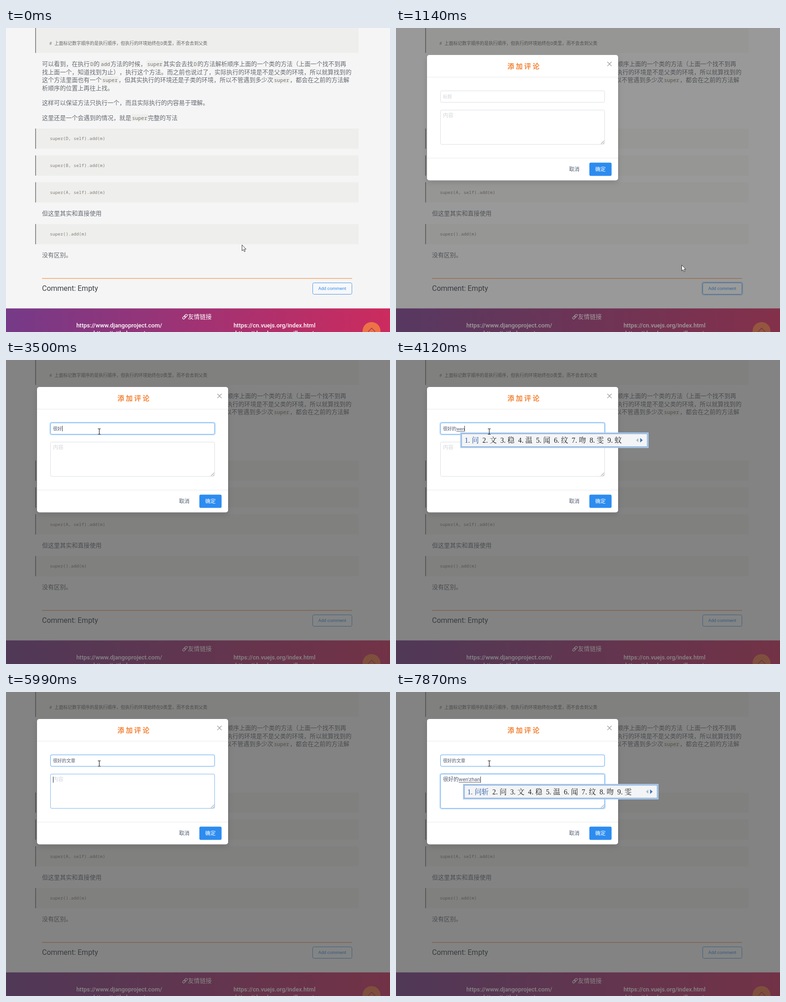
Recreate the animation shown at these times as an HTML page. Size 842 by 665 pixels, loop 8 s.

```html
<!DOCTYPE html>
<html lang="zh">
<head>
<meta charset="utf-8">
<title>添加评论</title>
<style>
html, body { margin: 0; width: 100%; height: 100%; overflow: hidden; background: #f5f5f5; }
svg { display: block; width: 842px; height: 665px; text-spacing-trim: space-all; font-family: Roboto, "Noto Sans CJK SC", "Noto Sans CJK", sans-serif; }
.p { font-size: 13.06px; font-weight: 300; fill: #666b72; }
.c { font: 300 9.63px "Noto Sans Mono", "Noto Sans CJK SC", "Noto Sans CJK", monospace; fill: #857e76; }
.k { font: 300 11.1px "Noto Sans Mono", monospace; fill: #77736f; }
.link { font-size: 13px; font-weight: 500; fill: #fff; text-anchor: middle; }
.cand { font: 15.66px "Liberation Serif", "Noto Serif CJK SC", "Noto Sans CJK SC", "Noto Sans CJK", serif; fill: #222; }
.cand.first { fill: #2858a8; }
.hint { fill: #d3d5d9; }
.typed { fill: #515a6e; }
</style>
</head>
<body>
<svg viewBox="0 0 842 665">
  <defs>
    <linearGradient id="foot"><stop stop-color="#753a88"/><stop offset="1" stop-color="#cc2b5e"/></linearGradient>
    <filter id="soft" x="-10%" y="-10%" width="120%" height="125%"><feDropShadow dx="0" dy="4" stdDeviation="6" flood-opacity=".15"/></filter>
  </defs>
  <rect width="842" height="665" fill="#f5f5f5"/>
  <g id="article"></g>
  <path d="M79 547.7H759" stroke="#f3a469" stroke-width="1.6"/>
  <text x="79" y="575" font-size="16" fill="#3c4148">Comment: Empty</text>
  <rect id="ring" x="671" y="556" width="89" height="28" rx="4" fill="none" stroke="#2d8cf0" stroke-opacity=".3" stroke-width="2"/>
  <rect x="672.5" y="557.5" width="86" height="25" rx="3" fill="#f7f8f9" stroke="#4a98e8"/>
  <text x="715.4" y="573" font-size="9.75" fill="#2d8cf0" text-anchor="middle">Add comment</text>

  <rect y="613.4" width="842" height="52" fill="url(#foot)"/>
  <g fill="none" stroke="#fff" stroke-width="1.2" transform="translate(392.5 631.5) rotate(-45)">
    <rect x="-6.4" y="-2.2" width="7.6" height="4.4" rx="2.2"/>
    <rect x="-1.2" y="-2.2" width="7.6" height="4.4" rx="2.2"/>
  </g>
  <text x="398.8" y="635.5" font-size="13.06" fill="#fff">友情链接</text>
  <g class="link">
    <text x="248.3" y="654.5">https://www.djangoproject.com/</text>
    <text x="588.7" y="654.5">https://cn.vuejs.org/index.html</text>
    <text x="248.3" y="672">https://github.com/</text>
    <text x="588.7" y="672">https://developer.mozilla.org/</text>
  </g>
  <circle cx="801.5" cy="663" r="19.7" fill="#ec7347"/>
  <path d="M794 664.5L801.7 656.5 809.5 664.5" fill="none" stroke="#b02f50" stroke-width="1.4"/>

  <rect id="mask" width="842" height="665" fill="#373737"/>

  <g id="modal">
    <rect x="68" y="59" width="419" height="274.3" rx="5" fill="#fff" filter="url(#soft)"/>
    <path d="M68 107.5H487M68 284.5H487" stroke="#e8eaec"/>
    <text x="244.3" y="88.6" font-size="15" font-weight="700" letter-spacing="3.4" fill="#f5863b">添加评论</text>
    <path d="M463.4 74L472.8 83.4M472.8 74L463.4 83.4" stroke="#999" stroke-width="1.2"/>
    <g id="fields"></g>
    <path d="M449.5 253.5L456.5 246.5M453.5 253.5L456.5 250.5" stroke="#777"/>
    <text x="379.6" y="313.3" font-size="11.4" fill="#515a6e">取消</text>
    <rect x="424" y="294.5" width="48.7" height="29" rx="3" fill="#2d8cf0"/>
    <text x="436.8" y="313.3" font-size="11.4" font-weight="500" fill="#fff">确定</text>
  </g>
  <g id="ime"></g>
  <g id="cursor"></g>
</svg>
<script>
const $ = id => document.getElementById(id);
const clamp = v => Math.max(0, Math.min(1, v));
const text = (cls, x, y, s, extra = '') => `<text class="${cls}" x="${x}" y="${y}" ${extra}>${s}</text>`;

// Article
const block = (y, h) => `<rect x="64" y="${y}" width="709" height="${h}" fill="#eeeeec"/><rect x="64" y="${y}" width="1.7" height="${h}" fill="#7c7c7c"/>`;
const snippet = (y, s) => block(y, 44.2) + text('c', 96.3, y + 25.2, s);
const para = (y, s, x = 79) => text('p', x, y, s);
const inline = (x, y, s) => `<rect x="${x - 2}" y="${y - 12}" width="${s.length * 6.66 + 4}" height="15" rx="2" fill="#eeeeec"/>` + text('k', x, y, s);

$('article').innerHTML = [
  block(-10, 64.5),
  text('c', 95, 37, '# '),
  text('c', 106.3, 37, '上面标记数字顺序的是执行顺序，但执行的环境始终在D类里，而不会去到父类', 'style="font-size:9.7px;fill:#666"'),
  para(82.7, '可以看到，在执行'), inline(185, 82.7, 'D'), para(82.7, '的', 192.3), inline(208, 82.7, 'add'),
  para(82.7, '方法的时候，', 229.3), inline(309.7, 82.7, 'super'), para(82.7, '其实会去找', 345), inline(411.7, 82.7, 'D'),
  para(82.7, '的方法解析顺序上面的一个类的方法（上面一个找不到再', 419.8),
  para(100.5, '找上面一个，知道找到为止），执行这个方法。而之前也说过了，实际执行的环境是不是父类的环境，所以就算找到的'),
  para(118.3, '这个方法里面也有一个'), inline(211.5, 118.3, 'super'),
  para(118.3, '，但其实执行的环境还是子类的环境，所以不管遇到多少次', 246.6), inline(587.7, 118.3, 'super'),
  para(118.3, '，都会在之前的方法解', 622.3),
  para(136.2, '析顺序的位置上再往上找。'),
  para(168.2, '这样可以保证方法只执行一个，而且实际执行的内容易于理解。'),
  para(200.6, '这里还是一个会遇到的情况，就是'), inline(276.4, 200.6, 'super'), para(200.6, '完整的写法', 311),
  snippet(220, 'super(D, self).add(m)'), snippet(278.7, 'super(B, self).add(m)'), snippet(337.4, 'super(A, self).add(m)'),
  para(409.5, '但这里其实和直接使用'),
  snippet(428.8, 'super().add(m)'),
  para(500.5, '没有区别。')
].join('');

// Input method: suggestions by typed letters
const words = {
  h: '和 好 还 会 或 后 很 回 话',
  he: '和 喝 何 合 河 核 贺 盒 荷',
  hen: '很 恨 狠 痕 哏 很好 很多 很大 亨',
  "hen'h": '很好 很坏 狠狠 很 恨 狠 痕 哏 亨',
  "hen'ha": '很好 很哈 狠哈 很 恨 狠 痕 哏 亨',
  "hen'hao": '很好 恨好 狠好 很 恨 狠 痕 哏 亨',
  d: '的 大 到 都 对 多 但 地 得',
  de: '的 的话 得到 的人 的是 得知 得了 地方 得',
  w: '我 为 文 无 玩 完 问 位 往',
  we: '为 我 问 位 文 未 围 微 味',
  wen: '问 文 稳 温 闻 纹 吻 雯 蚊',
  "wen'z": '文章 文字 蚊子 文中 稳重 文职 蚊帐 问着 问这',
  "wen'zh": '文章 文中 稳重 文职 蚊帐 问着 问这 问这个 问着了',
  "wen'zha": '文章 问斩 稳扎 问 文 稳 温 闻 纹',
  "wen'zhan": '问斩 问 文 稳 温 闻 纹 吻 雯',
  "wen'zhang": '文章 问 文 稳 温 闻 纹 吻 雯'
};
// [tick, committed, composing]
const title = [
  [0, '', ''], [23, '', 'h'], [24, '', 'he'], [25, '', "hen'h"], [26, '', "hen'ha"], [27, '', "hen'hao"], [28, '很好', ''],
  [29, '很好', 'd'], [30, '很好', 'de'], [31, '很好的', ''], [32, '很好的', 'we'], [33, '很好的', 'wen'], [41, '很好的', "wen'z"],
  [42, '很好的', "wen'zh"], [43, '很好的', "wen'zha"], [44, '很好的', "wen'zhang"], [45, '很好的文章', '']
];
const body = [
  [0, '', ''], [51, '', 'h'], [52, '', 'he'], [53, '', 'hen'], [54, '', "hen'ha"], [55, '', "hen'hao"], [56, '很好', ''],
  [57, '很好', 'de'], [58, '很好的', ''], [59, '很好的', 'w'], [60, '很好的', 'wen'], [61, '很好的', "wen'z"],
  [62, '很好的', "wen'zh"], [63, '很好的', "wen'zhan"]
];
const at = (list, k) => list.filter(e => e[0] <= k).pop();

function candidates(left, top, key) {
  const unit = 7.83;
  let x = left + 9.5, out = '';
  words[key].split(' ').forEach((w, i) => {
    const cls = i ? 'cand' : 'cand first';
    out += text(cls, x, top + 22.8, i + 1 + '.') + text(cls, x + 2 * unit, top + 22.8, w);
    x += (3 + 2 * w.length) * unit;
  });
  const width = x - unit + 59 - left, r = left + width, y = top + 17;
  return `<rect x="${left + 1.5}" y="${top + 1.5}" width="${width - 3}" height="31" fill="#f3f4f6" stroke="#a9caf0" stroke-width="3"/>
    <rect x="${left + 3}" y="${top + 3}" width="${width - 6}" height="28" fill="none" stroke="#7da3d0"/>${out}
    <path d="M${r - 22.5} ${y - 4.5}v9l-5 -4.5z" fill="#a9b9cc"/><path d="M${r - 18.5} ${y - 5}v10l5.5 -5z" fill="#3f74b8"/>`;
}

function field(f, k) {
  const [, done, typing] = at(f.steps, k);
  const ring = f.focus * .2;
  const s = done || typing ? text('typed', 103, f.base, `${done}<tspan>${typing}</tspan>`, `id="${f.id}" font-size="${f.size}"`)
    : text('hint', 103, f.base, f.hint, `font-size="${f.size}"`);
  return `<rect x="96" y="${f.y - 1.5}" width="363" height="${f.h + 3}" rx="4" fill="none" stroke="#2d8cf0" stroke-width="2" stroke-opacity="${ring}"/>
    <rect x="97.5" y="${f.y}" width="360" height="${f.h}" rx="3" fill="#fff" stroke="#dcdee2"/>
    <rect x="97.5" y="${f.y}" width="360" height="${f.h}" rx="3" fill="none" stroke="#57a3f3" stroke-opacity="${f.edge}"/>${s}`;
}

const path = [[0, 517, 474], [5, 706, 576], [7.5, 706, 576], [9, 626, 518], [12, 300, 238], [15, 204, 156], [99, 204, 156]];
function pointer(k) {
  const i = path.findIndex(p => p[0] > k), a = path[i - 1], b = path[i];
  const u = (k - a[0]) / (b[0] - a[0]);
  return [a[1] + (b[1] - a[1]) * u, a[2] + (b[2] - a[2]) * u];
}

function draw(k) {
  const ms = k * 125;
  const fade = clamp((ms - 860) / 330), z = clamp((ms - 860) / 240);
  const scale = z * z * (3 - 2 * z);
  $('mask').setAttribute('opacity', fade * .6);
  $('ring').setAttribute('opacity', k >= 6 && k <= 10 ? 1 : 0);
  $('modal').setAttribute('opacity', scale);
  $('modal').setAttribute('transform', `translate(715 570) scale(${scale}) translate(-715 -570)`);

  const [px, py] = pointer(k);
  const inBody = k >= 48;
  const top = { id: 'title', steps: title, y: 137.5, h: 25, base: 154, size: 9.8, hint: '标题',
    focus: inBody ? 0 : clamp((k - 15) / 2), edge: k >= 15 ? 1 : 0 };
  const low = { id: 'body', steps: body, y: 179.5, h: 75, base: 195.3, size: 11.5, hint: '内容',
    focus: clamp(k - 48), edge: inBody ? clamp((k - 46.6) / 2) : k >= 12 && k < 15 ? 1 : 0 };
  $('fields').innerHTML = field(top, k) + field(low, k);

  // Caret, underline and suggestion window of the focused field
  let ime = '';
  const f = inBody ? low : top;
  if (k >= 16) {
    const [, done, typing] = at(f.steps, k);
    const el = $(f.id), end = 103 + (el ? el.getComputedTextLength() : 0);
    const start = 103 + done.length * f.size;
    if (typing) {
      ime += `<path d="M${start} ${f.base + 2.2}H${end}" stroke="#515a6e"/>`;
      ime += candidates(start + (inBody ? 9.5 : 8.5), inBody ? 201 : 158.5, typing);
    }
    const off = k >= 20 && k < 23 || k >= 37 && k < 41;
    if (!off) ime += `<rect x="${Math.round(end)}" y="${inBody ? 185 : 144}" width="1" height="${inBody ? 13.5 : 12}" fill="#333"/>`;
  }
  $('ime').innerHTML = ime;

  $('cursor').setAttribute('transform', `translate(${px} ${py})`);
  $('cursor').innerHTML = k >= 12
    ? '<path d="M-2.5 -5.5H-.5L.5 -5 1.5 -5.5H3.5M.5 -5V6M-2.5 6.5H-.5L.5 6 1.5 6.5H3.5" fill="none" stroke="#111" stroke-width="1.1"/>'
    : '<path d="M.5 .5V13.3L3.4 10.6 5.5 15.3 7.6 14.3 5.6 9.8H9.4Z" fill="#fff" stroke="#222" stroke-width=".9"/>';
}

let last = -1;
const begin = performance.now();
function loop() {
  const t = (performance.now() - begin) % 8000;
  const k = Math.min(63, Math.floor((t + 10) / 125));
  if (k !== last) draw(last = k);
  requestAnimationFrame(loop);
}
loop();
</script>
</body>
</html>
```
